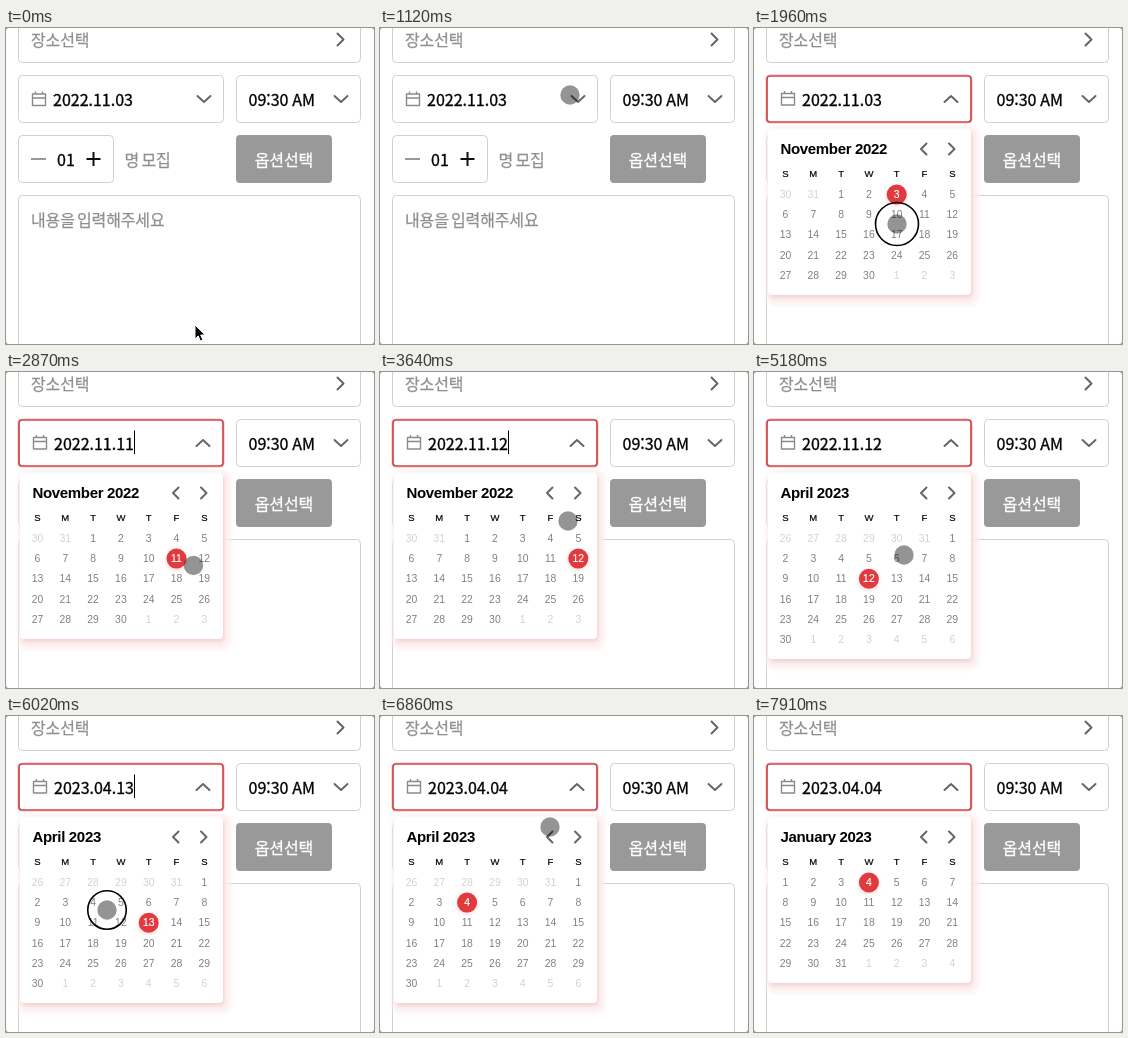
Animation, 368 px wide and 316 px high, one loop 8470 ms. Source, as an HTML page:

```html
<!DOCTYPE html>
<html lang="ko">
<head>
<meta charset="utf-8">
<style>
  html, body { margin: 0; width: 100%; height: 100%; overflow: hidden; background: #fff; }
  svg { display: block; }
  text {
    font-family: "Noto Sans CJK KR", "Noto Sans CJK", sans-serif; font-size: 16px;
    font-feature-settings: "calt" 0; stroke: #000; stroke-width: .3px;
  }
  .hint { fill: #8f8f8f; stroke: #8f8f8f; stroke-width: .25px; letter-spacing: -.15px; word-spacing: -2px; }
  .button { fill: #fff; stroke: #fff; text-anchor: middle; letter-spacing: -.1px; }
  .box { fill: #fff; stroke: #d0d0d0; }
  .line { fill: none; stroke: #666; stroke-width: 2; stroke-linecap: round; stroke-linejoin: round; }
  .cal text { font-family: "Liberation Sans", Arial, sans-serif; font-size: 10.4px; text-anchor: middle; stroke: none; }
  .cal .title { font-size: 15px; font-weight: bold; letter-spacing: -.33px; text-anchor: start; }
  .cal .week { font-size: 9.5px; stroke: #000; stroke-width: .2px; }
  .day { fill: #808080; }
  .other { fill: #d2d2d2; }
  .cal .picked { fill: #fff; stroke: #fff; stroke-width: .2px; }
</style>
</head>
<body>
<svg width="368" height="316" viewBox="0 0 368 316">
  <defs>
    <filter id="soft" x="-20%" y="-20%" width="140%" height="140%"><feGaussianBlur stdDeviation="2"/></filter>
  </defs>
  <rect class="box" x="12.5" y="-12.5" width="342" height="47" rx="4"/>
  <text class="hint" x="25" y="17.5">장소선택</text>
  <path class="line" d="M331.5 5.5l6 6-6 6"/>

  <rect class="box" x="230.5" y="47.5" width="124" height="47" rx="4"/>
  <text x="242.5" y="78" word-spacing="-.7">09:30 AM</text>
  <path class="line" d="M328.5 68l6.500 6 6.500-6"/>

  <rect class="box" x="12.5" y="107.5" width="95" height="47" rx="4"/>
  <path d="M25 131h15" stroke="#999" stroke-width="2"/>
  <text x="51" y="138" stroke="none">01</text>
  <path d="M80.500 131h14m-7-7v14" stroke="#111" stroke-width="2"/>
  <text class="hint" x="118.500" y="137.500">명 모집</text>
  <rect x="230" y="107" width="96" height="48" rx="4" fill="#999"/>
  <text class="button" x="278" y="138">옵션선택</text>

  <rect class="box" x="12.5" y="167.5" width="342" height="180" rx="4"/>
  <text class="hint" x="25" y="198">내용을 입력해주세요</text>

  <g id="field"></g>
  <g id="cal" class="cal"></g>
  <g id="pointer"></g>
  <path fill="#999" fill-rule="evenodd" d="M0 0h368v316H0zM3 0Q0 0 0 3V313Q0 316 3 316H365Q368 316 368 313V3Q368 0 365 0z"/>
</svg>
<script>
const LOOP = 8470, STEP = 70, CARET = 480;
const $ = id => document.getElementById(id);

// The session is written as a script of pointer actions; each one advances the clock.
const moves = [], presses = [], events = [];
let clock = 0, place = [189, 297];

const wait = ms => clock += ms;
const act = change => events.push({ t: clock, change });
function go(x, y, ms) {
  moves.push({ t: clock, ms, from: place, to: place = [x, y] });
  clock += ms;
}
function click(delay, hold, change) {
  wait(delay);
  presses.push({ t: clock, hold });
  wait(hold);
  if (change) act(change);
}
const pick = date => s => Object.assign(s, { date, since: s.now });
const turn = by => s => s.shift += by;
function clickAgain(times, change) {
  while (times--) click(105, 70, change);
}

go(203, 190, 280);
go(190, 67, 280);
click(210, 350);
wait(140);
act(s => s.open = true);
wait(70);
go(143, 196, 350);
click(70, 350, pick("2022.11.10"));
go(184, 196, 210);
click(210, 140, pick("2022.11.11"));
wait(140);
go(191, 191, 140);
click(70, 210, pick("2022.11.12"));
wait(140);
go(188, 149, 280);
go(196, 121, 140);
click(70, 280, turn(1));
clickAgain(4, turn(1));
wait(140);
go(150, 183, 210);
go(148, 203, 140);
click(140, 140, pick("2023.04.13"));
wait(70);
go(101, 194, 210);
click(70, 140, pick("2023.04.05"));
wait(140);
go(99, 197, 70);
click(0, 70, pick("2023.04.04"));
go(170, 111, 490);
go(170, 117, 70);
click(0, 210, turn(-1));
clickAgain(2, turn(-1));
wait(70);
go(180, 330, 350);

function stateAt(t) {
  const s = { open: false, date: "2022.11.03", since: -LOOP, shift: 0 };
  for (const e of events) if (e.t <= t) {
    s.now = e.t;
    e.change(s);
  }
  return s;
}

function pointerAt(t) {
  const { t: t0, ms, from, to } = moves.filter(m => m.t <= t).pop();
  const k = Math.min(1, (t - t0) / ms);
  return from.map((v, i) => v + (to[i] - v) * k);
}

function fieldSvg(open, date, caret) {
  const frame = open
    ? `<rect x="13" y="48" width="204" height="46" rx="3.500" fill="none" stroke="#f3c4c5" stroke-width="4" opacity=".6"/>
       <rect x="13" y="48" width="204" height="46" rx="3" fill="#fff" stroke="#cf4347" stroke-width="1.700"/>`
    : '<rect class="box" x="12.5" y="47.5" width="205" height="47" rx="4"/>';
  const arrow = open ? "M190.500 74l6.500-6 6.500 6" : "M191.500 68l6.500 6 6.500-6";
  return frame +
    `<g transform="translate(${open ? "1 -.5" : "0 0"})"><path d="M26.500 66h13v11.500h-13zM26.500 70h13M29.500 63.500v3M36.500 63.500v3"
      fill="none" stroke="#8a8a8a" stroke-width="1.400" stroke-linejoin="round"/>
    <text x="47" y="78">${date}</text></g><path class="line" d="${arrow}"/>` +
    (caret ? '<path d="M128.500 58.500v23.500" stroke="#000"/>' : "");
}

function calendarSvg(shift, picked) {
  const first = new Date(2022, 10 + shift, 1);
  const year = first.getFullYear(), month = first.getMonth(), lead = first.getDay();
  const name = first.toLocaleString("en-US", { month: "long" });
  const rows = Math.ceil((lead + new Date(year, month + 1, 0).getDate()) / 7);
  const h = 66 + rows * 20.1;
  const colX = c => 31.5 + c * 27.8;
  let s = `<rect x="12" y="98" width="213" height="${h + 13}" rx="9" fill="#fdefef" opacity=".85" filter="url(#soft)"/>
    <rect x="16" y="104" width="202" height="${h - 1}" rx="4" fill="#d99" opacity=".4" filter="url(#soft)"/>
    <rect x="14" y="100.500" width="203" height="${h}" rx="4" fill="#fff"/>
    <text class="title" x="26.500" y="126">${name} ${year}</text>
    <path class="line" d="M172.500 115.500l-5.500 5.500 5.500 5.500M195 115.500l5.500 5.500-5.500 5.500"/>`;
  [..."SMTWTFS"].forEach((d, c) => s += `<text class="week" x="${colX(c)}" y="149.200">${d}</text>`);
  for (let i = 0; i < rows * 7; i++) {
    const date = new Date(year, month, 1 + i - lead), n = date.getDate();
    const x = colX(i % 7), y = 166.5 + Math.floor(i / 7) * 20.1;
    const inside = date.getMonth() === month, on = inside && n === picked;
    if (on) s += `<circle cx="${x}" cy="${y + 1.5}" r="10" fill="#e55" opacity=".25" filter="url(#soft)"/>
      <circle cx="${x}" cy="${y}" r="10" fill="#e0393e"/>`;
    s += `<text class="${on ? "picked" : inside ? "day" : "other"}" x="${x}" y="${y + 3.7}">${n}</text>`;
  }
  return s;
}

function pointerSvg(t) {
  if (t >= clock) return "";
  const [x, y] = pointerAt(t);
  if (t < STEP) return `<path transform="translate(${x} ${y})" d="M0 0v14l3.200-3 2.200 5 2.500-1.100-2.200-4.900h4.500z"
    fill="#000" stroke="#fff"/>`;
  const press = presses.find(p => t >= p.t && t < p.t + p.hold);
  const ring = press
    ? `<circle cx="${x}" cy="${y}" r="${17 + 4.5 * Math.min(1, (t - press.t) / 140)}" fill="none" stroke="#000" stroke-width="1.600"/>`
    : "";
  return `<circle cx="${x}" cy="${y}" r="9.700" fill="#000" fill-opacity=".42"/>` + ring;
}

function draw(t) {
  const { open, date, since, shift } = stateAt(t);
  $("field").innerHTML = fieldSvg(open, date, t - since < CARET);
  $("cal").innerHTML = open ? calendarSvg(shift, +date.slice(8)) : "";
  $("pointer").innerHTML = pointerSvg(t);
}

let last = -1;
function tick() {
  const t = Math.floor(performance.now() % LOOP / STEP) * STEP;
  if (t !== last) draw(last = t);
  requestAnimationFrame(tick);
}
tick();
</script>
</body>
</html>
```
